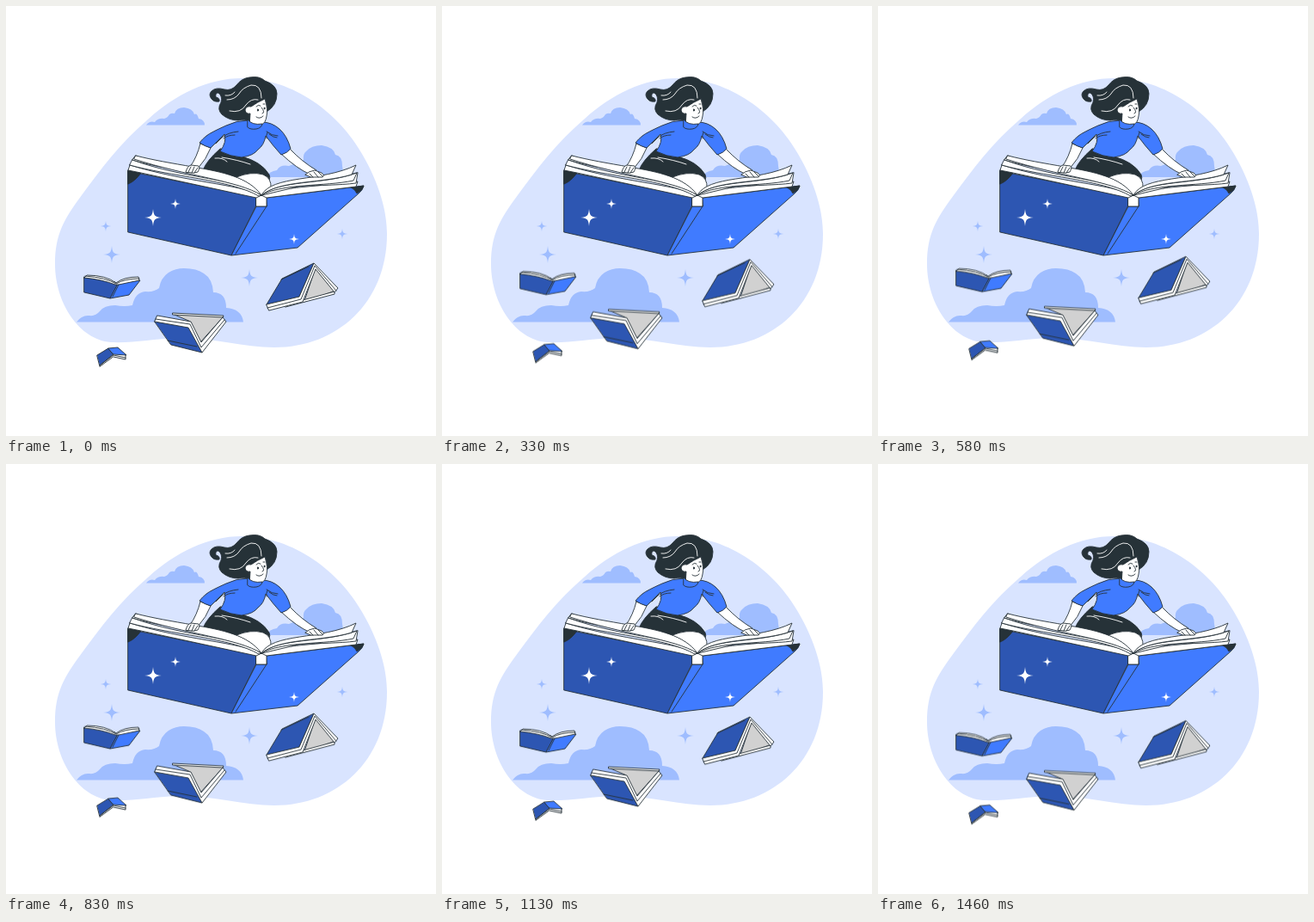
These frames come from a looping animation (500x500 px, 1.5 s). An HTML page without scripts:

```html
<!DOCTYPE html>
<html lang="en">
<head>
<meta charset="utf-8">
<title>Flying on a book</title>
<style>
  html, body { margin: 0; width: 100%; height: 100%; overflow: hidden; background: #fff; }
  svg { display: block; width: 100vw; height: 100vh; }
  .ink { stroke: #263238; stroke-width: .9; stroke-linejoin: round; stroke-linecap: round; }
  .white { fill: #fff; }
  .blue { fill: #407bff; }
  .navy { fill: #2d56b2; }
  .gray { fill: #d1d1d1; }
  .dark { fill: #263238; }
  .pale { fill: #9fbdff; }
  .line { fill: none; }
  .strand { fill: none; stroke: #fff; stroke-width: .9; stroke-linecap: round; }
  .float { animation: float 1.5s linear infinite; }
  @keyframes float { 50% { transform: translateY(-10px); } }
</style>
</head>
<body>
<svg viewBox="0 0 500 500">
  <defs>
    <path id="star" d="M0-10C.8-2 2-.8 10 0C2 .8 .8 2 0 10C-.8 2-2 .8-10 0C-2-.8-.8-2 0-10Z"/>
  </defs>

  <path fill="#d9e4ff" d="M274 84C335 84 388 126 414 172C435 208 443 240 443 265C443 345 385 397 312 397C275 397 240 385 200 386C170 387 150 392 122 391C85 388 57 345 57 300C57 265 68 247 88 220C110 190 133 159 166 131C197 103 235 84 274 84Z"/>

  <g class="pale">
    <path d="M163 138.6Q167 133 173 135Q177 130 184 131Q188 130 190 126Q193 124 196 125Q198 118 207 118Q217 119 219 126Q222 124 224 131Q231 132 231 138.6Z"/>
    <path d="M303 199Q306 192 315 191Q319 184 329 186Q337 183 346 179Q345 172 349 169Q355 162 367 162Q381 164 383 173Q391 174 391 186L393 199Z"/>
    <path d="M82 367.5Q88 359 97 360Q104 361 109 355Q114 348 127 348Q138 350 147 348Q150 333 162 332Q172 333 178 328Q180 316 189 310Q197 305 207 305Q222 305 230 311Q240 317 241 333Q256 333 256 351Q274 352 276 367.5Z"/>
    <use href="#star" transform="translate(116 256)scale(.62)"/>
    <use href="#star" transform="translate(123 289)"/>
    <use href="#star" transform="translate(283 316)"/>
    <use href="#star" transform="translate(391 265)scale(.62)"/>
  </g>

  <!-- Rider -->
  <g class="ink">
    <path class="dark" d="M249 166Q233 180 229 191Q230 198 260 201L300 208Q309 203 306 196Q297 181 274 175Z"/>
    <path class="white" d="M268 199Q285 192 299 196Q309 200 308 212L297 220Z"/>
    <path class="white" d="M226 160L238 165Q233 178 223 189L214 187Q222 176 226 160Z"/>
    <path class="white" d="M320 172L330 166Q344 181 361 191L354 196Q338 189 320 172Z"/>
    <path class="blue" d="M281 133Q268 133 256 139Q238 147 233 151Q228 155 225 159Q231 163 238 165L254 149Q257 158 249 169Q261 175 274 176Q288 174 293 167Q300 162 302 151Q310 162 320 173Q327 171 331 166Q327 151 318 143Q309 135 298 135Z"/>
    <path class="line" d="M270 146Q258 147 251 153L244 160M266 150Q258 150 253 154M303 154Q302 151 304 147M306 149Q311 153 315 153M303 146Q309 151 316 151"/>
    <path class="dark" d="M301 107Q305 118 303 123Q315 116 315 102Q315 92 301 87Q295 81 283 83Q274 84 268 92Q262 99 254 97Q244 94 239 99Q235 103 239 108Q242 112 248 111Q249 107 244 106Q243 101 247 101Q252 105 250 112Q245 120 251 126Q259 133 270 133Q278 131 283 134L290 124Z"/>
    <path class="white" d="M301 108Q292 112 285 117Q279 116 278 121Q279 126 284 125L283 139Q292 144 297 138Q302 136 303 128Q305 121 301 108Z"/>
    <path class="blue" d="M281 132Q286 139 298 137Q297 142 291 143Q284 144 281 141Z"/>
    <path class="line" d="M291 117Q293 114 296 116M299 114L301 114M297 118Q302 124 298 125M291 129Q295 132 299 128"/>
    <ellipse class="dark" cx="293" cy="121" rx=".5" ry="1.3"/>
    <ellipse class="dark" cx="300.5" cy="119" rx=".4" ry="1.1"/>
  </g>
  <g class="strand">
    <path d="M297 107Q297 91 285 92Q275 95 271 102Q266 109 257 109"/>
    <path d="M293 109Q285 107 279 115Q273 125 260 122"/>
    <path d="M266 100Q262 105 255 104M251 176Q270 179 284 184M243 177Q252 176 257 181"/>
  </g>

  <!-- Large book -->
  <g class="ink">
    <path class="navy" d="M142 192L291 222V232L262 290L142 263Z"/>
    <path class="dark" d="M142 191L157 194Q150 204 142 207Z"/>
    <path class="blue" d="M303 223L416 209Q415 214 410 218L339 281L262 290L291 233H303Z"/>
    <path class="line" d="M303 233L267 288"/>
    <path class="dark" d="M401 211L416 209Q415 214 408 218Q406 213 401 211Z"/>
    <path class="white" d="M291 220H303V233H291Z"/>
    <path class="white" d="M144 185L142 191L157 194L291 223L297 220C270 207 210 205 144 185Z"/>
    <path class="white" d="M144 185C190 198 261 202 294 221L297 220C270 200 210 202 147 179Z"/>
    <path class="white" d="M147 179C195 194 265 196 297 220C270 196 200 197 151 174Z"/>
    <path class="white" d="M151 174C170 179 194 183 217 187C252 193 282 199 297 220C270 203 210 198 149 178Z"/>
    <path class="white" d="M297 220L303 223L407 210L409 204C368 210 317 210 297 220Z"/>
    <path class="white" d="M297 220C314 205 368 211 407 206L409 194Z"/>
    <path class="white" d="M297 220C316 202 372 208 408 194L404 203C371 210 321 206 297 220Z"/>
    <path class="white" d="M297 220C309 196 367 205 407 185L402 196C365 207 319 202 297 220Z"/>
    <path class="white" d="M209 193Q211 186 215 185L224 186Q226 188 223 193L219 194Z"/>
    <path class="line" d="M215 187L212 193M219 187L216 194M223 188L219 194"/>
    <path class="white" d="M348 196Q352 192 359 191L367 194Q371 197 368 199L355 199Z"/>
    <path class="line" d="M353 195L357 199M358 193L363 199M363 193L368 198"/>
  </g>
  <g class="white">
    <use href="#star" transform="translate(171 246)"/>
    <use href="#star" transform="translate(197 230)scale(.6)"/>
    <use href="#star" transform="translate(335 271)scale(.6)"/>
  </g>

  <!-- Small drifting books -->
  <g class="ink float">
    <g>
      <path class="navy" d="M91 315L127 321L129 325L121 340L91 333Z"/>
      <path class="blue" d="M129 322L156 319L143 336L121 340L129 325Z"/>
      <path class="white" d="M91 316L94 313Q116 313 128 322Q137 315 154 315L155 319L131 324L127 324Q112 318 91 316Z"/>
      <path class="line" d="M92 314Q117 316 128 323Q138 317 155 317M131 324L124 338"/>
    </g>
    <g>
      <path class="gray" d="M194 358L253 361L226 391L214 367Z"/>
      <path class="white" d="M194 357L253 360L252 362L194 359Z"/>
      <path class="navy" d="M173 367L213 373L228 403L192 394Z"/>
      <path class="white" d="M176 360L215 367L227 391L252 362L256 367L228 403L212 374L173 367Z"/>
      <path class="line" d="M174 364L214 370L227 397L254 365M188 389L222 396"/>
    </g>
    <g>
      <path class="gray" d="M360 305L383 331L347 344Z"/>
      <path class="white" d="M323 348L382 332L382 335L325 350Z"/>
      <path class="navy" d="M303 347L321 317L358 299L341 338Z"/>
      <path class="white" d="M303 347L341 338L358 299L386 328L382 333L360 306L345 344L306 354Z"/>
      <path class="line" d="M304 351L343 341L359 302L384 331M320 318L352 303"/>
    </g>
    <g>
      <path class="white" d="M109 419L111 413L125 403L139 405L139 411L125 408Z"/>
      <path class="navy" d="M106 406L119 398L125 405L109 418Z"/>
      <path class="blue" d="M119 398L130 397L140 406L125 405Z"/>
      <path class="line" d="M110 417L125 406L139 409"/>
    </g>
  </g>
</svg>
</body>
</html>
```
